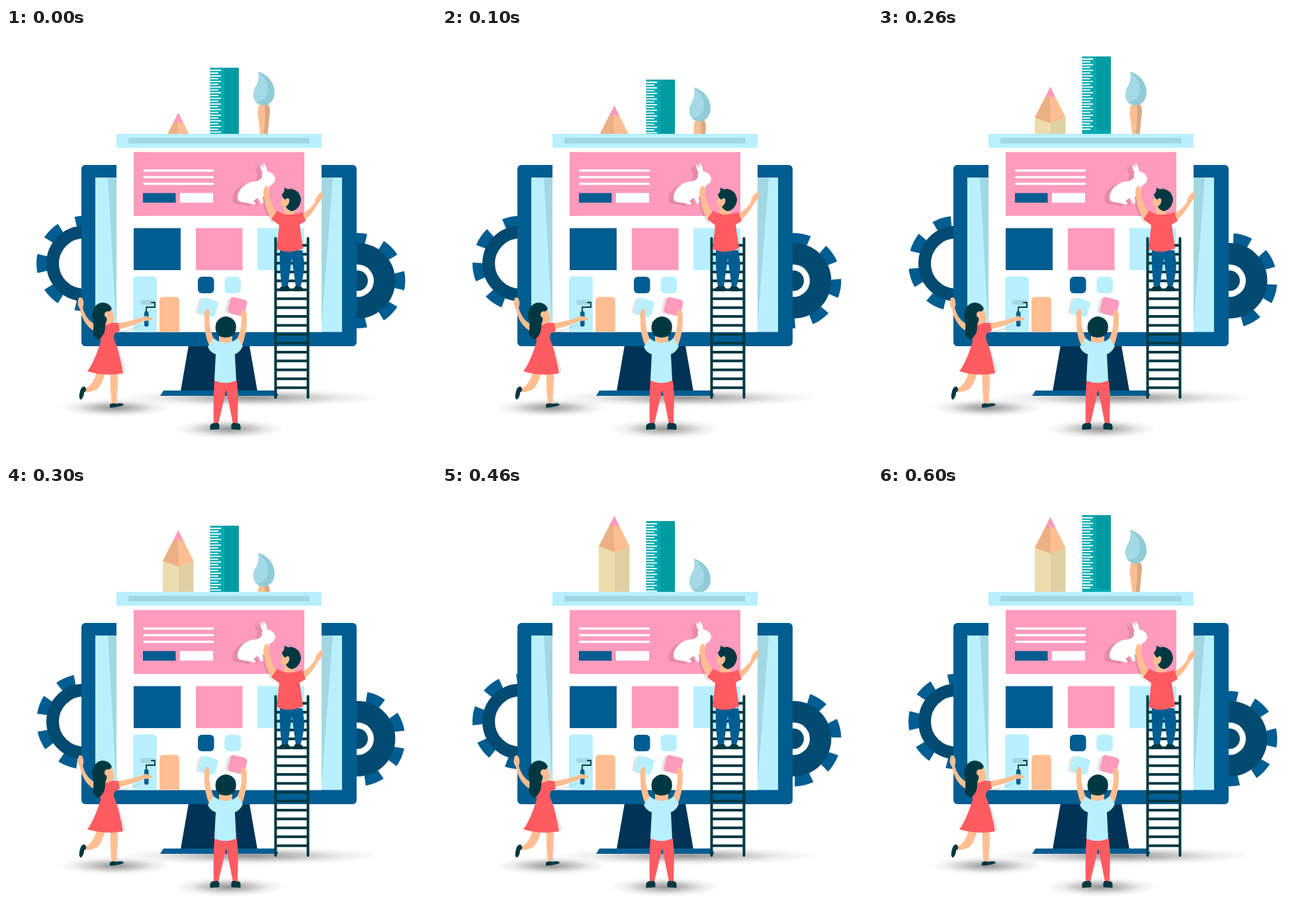
An HTML page that plays this animation: 650x650 px, repeating every 0.7 s.

```html
<!DOCTYPE html>
<html lang="en">
<head>
<meta charset="utf-8">
<title>Building a page</title>
<style>
  html, body { margin: 0; width: 100%; height: 100%; overflow: hidden; background: #fff; }
  svg { display: block; width: 100vw; height: 100vh; }
  .blue { fill: #005d91; } .navy { fill: #034a71; } .ink { fill: #003842; }
  .sky { fill: #b8f0ff; } .mist { fill: #a1d8e4; } .pink { fill: #ff9bbc; }
  .skin { fill: #ffbe91; } .red { fill: #ff5c62; } .white { fill: #fff; }
  .limb { fill: none; stroke: #ffbe91; stroke-linecap: round; stroke-linejoin: round; }
  .cast { fill: #000; opacity: .1; }
  .line { fill: none; stroke: #003842; stroke-linecap: round; }
</style>
</head>
<body>
<svg viewBox="0 0 650 650">
  <defs>
    <radialGradient id="shade">
      <stop offset="0" stop-opacity=".42"/>
      <stop offset=".35" stop-opacity=".25"/>
      <stop offset=".7" stop-opacity=".07"/>
      <stop offset="1" stop-opacity="0"/>
    </radialGradient>
    <clipPath id="above"><path d="M160 0H480V160H160Z"/></clipPath>
    <path id="rabbit" d="M389 204C394 208 394 212 395 217C402 218 407 222 407 229C406 235 401 237 398 239Q398 246 393 251L388 256Q390 261 389 264Q386 267 384 263L381 257Q376 259 374 262L378 265Q375 268 369 265L356 263Q350 262 350 256C351 243 363 233 376 232Q384 231 387 226Q386 221 388 218Q383 212 385 206Q388 209 390 213Q388 208 389 204Z"/>
  </defs>

  <!-- ground shadows -->
  <g fill="url(#shade)">
    <ellipse cx="370" cy="559" rx="200" ry="14"/>
    <ellipse cx="165" cy="574" rx="85" ry="14"/>
    <ellipse cx="337" cy="606" rx="84" ry="15"/>
  </g>

  <!-- gears -->
  <g transform="translate(118 356)">
    <g id="gearL" class="blue"></g>
    <circle r="47.5" fill="none" stroke="#034a71" stroke-width="19"/>
  </g>
  <g transform="translate(531.5 382)">
    <g id="gearR" class="blue"></g>
    <circle r="57" class="navy"/>
    <circle r="24.5" class="white"/>
    <circle r="15.5" class="navy"/>
  </g>

  <!-- monitor -->
  <path d="M276 480H368L380 549H264Z" fill="#003356"/>
  <path d="M238 548H407L412 556H233Z" class="blue"/>
  <rect x="114" y="207" width="416" height="274" rx="6" class="blue"/>
  <path d="M135 226H508V459.500H135Z" class="sky"/>
  <path d="M154 226H167V459ZM477 226H494L477 450Z" class="mist"/>

  <!-- tools -->
  <g clip-path="url(#above)">
    <g id="pencil">
      <path d="M237 45H261V200H237Z" fill="#eddcae"/>
      <path d="M261 45H283.500V200H261Z" fill="#e0d1a4"/>
      <path d="M260.500 0L237 46L261 55Z" fill="#ecb085"/>
      <path d="M260.500 0L283.500 46L261 55Z" class="skin"/>
      <path d="M260.500 0L253 15Q257 18 260.500 13Q264 18 268 15Z" class="pink"/>
    </g>
    <g id="ruler">
      <path d="M308.500 0H352V140H308.500Z" fill="#00aab0"/>
      <path d="M330 0H352V113L330 110Z" fill="#009aa1"/>
      <path id="ticks" stroke="#fff" stroke-width="1.800"/>
    </g>
    <g id="brush">
      <path d="M383 50H397Q400 57 398 68L395 100H385L381 68Q379 57 383 50Z" class="skin"/>
      <path d="M391 50H397Q400 57 398 68L395 100H389Q393 70 391 50Z" fill="#d9a983"/>
      <path d="M381 0C397 4 407 19 406 33C405 46 396 51 389 51C379 51 374 43 374 34C374 23 385 18 381 0Z" fill="#91cbd8"/>
      <path d="M381 0C392 9 397 19 396 30C395 39 389 45 379 46C375 43 374 39 374 34C374 23 385 18 381 0Z" fill="#a2dae5"/>
    </g>
  </g>

  <!-- page -->
  <path d="M167 160H477V459.500H167Z" class="white"/>
  <path d="M167 160H477V181H167Z" class="sky"/>
  <path d="M185 166H458.500V174.500H185Z" class="mist"/>
  <path d="M193 187.500H451V284H193Z" class="pink"/>
  <path d="M209 215.500H312.500M209 225.500H312.500M209 235.500H312.500" stroke="#fff" stroke-width="3.600" stroke-linecap="round"/>
  <path d="M207 249.500H256.500V264H207Z" class="blue"/>
  <path d="M263 249.500H313V264H263Z" class="white"/>
  <use href="#rabbit" x="-8" y="3" class="cast"/>
  <use href="#rabbit" class="white"/>
  <path d="M193 302.500H264V366H193Z" class="blue"/>
  <path d="M287 302.500H357.500V366H287Z" class="pink"/>
  <path d="M380 302.500H451V366H380Z" class="sky"/>
  <path d="M192 459.500V381Q192 375.500 198 375.500H222Q228 375.500 228 381V459.500Z" class="sky"/>
  <path d="M232 459.500V412Q232 406.500 238 406.500H256Q262 406.500 262 412V459.500Z" class="skin"/>
  <rect x="290" y="376" width="24.500" height="25" rx="6" class="blue"/>
  <rect x="330.500" y="376" width="24.500" height="25" rx="6" class="sky"/>
  <g transform="rotate(16 305 422)">
    <rect x="289" y="411" width="25" height="25" rx="5" class="cast"/>
    <rect x="293" y="409.500" width="26" height="25" rx="5" class="sky"/>
  </g>
  <g transform="rotate(14 350 421)">
    <rect x="333" y="410" width="25" height="25" rx="5" class="cast"/>
    <rect x="337" y="408.500" width="26" height="25" rx="5" class="pink"/>
  </g>

  <!-- ladder -->
  <path id="ladder" class="line" stroke-width="4"/>

  <!-- climber -->
  <path d="M387 252Q389 284 404 296L410 286Z" class="cast"/>
  <path d="M414 336H448L451 357Q450 377 445 391H438L432 348L426 391H417Q413 364 414 336Z" class="blue"/>
  <path d="M413 398V394Q416 389 421 391Q427 388 427 391L431 396Q429 398 423 398ZM449 398V394Q446 389 442 391Q437 388 437 391L432 396Q434 398 440 398Z" class="ink"/>
  <path d="M398 246Q396 260 411 282L403 290Q392 276 391 259Q387 247 391 241Q394 236 396 240Z" class="skin"/>
  <path d="M446 282Q461 274 467 263Q467 254 477 248Q481 250 478 258L471 266Q464 281 451 291Z" class="skin"/>
  <path d="M421 266L420 280Q427 288 436 279L434 263Z" class="skin"/>
  <path d="M401 289L410 276Q425 287 448 278L453 292L444 297L449 333Q428 343 409 334L413 298Z" class="red"/>
  <path d="M418 254Q414 263 416 268Q419 273 426 269L434 254Z" class="skin"/>
  <path d="M421 241Q425 245 431 243Q445 246 446 260Q444 274 432 277Q425 275 423 270Q430 265 428 258L423 260Q418 258 417 251Q421 250 421 241Z" class="ink"/>
  <path d="M420 266Q421 258 426 257Q431 260 424 267Z" class="skin"/>

  <!-- painter -->
  <rect x="203" y="411" width="23" height="7.500" rx="3.700" class="mist"/>
  <path d="M220 415H225V422H212V431" class="line" stroke-width="1.800"/>
  <path d="M172 459Q196 452 211 447Q194 455 171 463Z" class="cast"/>
  <path d="M164 477Q175 490 181 520L174 523ZM163 524H171Q169 543 169 566H164Z" class="cast"/>
  <rect x="209" y="428" width="6.500" height="23.500" rx="3" class="blue"/>
  <path d="M138 449Q122 444 116 423Q119 415 115 408Q109 405 109 413Q107 418 112 425Q116 449 136 460Z" class="skin"/>
  <path d="M169 446Q185 444 204 438Q212 433 215 437Q224 437 221 441Q214 443 208 443Q190 451 168 456Z" class="skin"/>
  <path d="M158 520H168Q169 541 166 569H160Q157 544 158 520Z" class="skin"/>
  <path d="M137 520H150Q147 536 138 546Q129 551 119 550L119 545Q132 541 137 520Z" class="skin"/>
  <path d="M157 574V569Q161 566 167 568Q177 566 178 570Q171 573 157 574Z" class="ink"/>
  <path d="M119 542Q124 547 118 551Q118 558 113 562Q109 560 112 549Q114 541 119 542Z" class="ink"/>
  <path d="M148 440H157L156 450L149 453Z" class="skin"/>
  <path d="M146 447Q152 451 159 445L170 446L172 458L165 461Q161 467 165 474Q171 489 177 522Q149 527 123 519Q134 504 143 474Q143 462 133 459L134 448Z" class="red"/>
  <path d="M151 419Q161 421 162 432L164 439Q162 447 155 447Q147 446 147 438Z" class="skin"/>
  <path d="M160 424Q156 415 145 415Q132 417 130 435Q134 447 131 462Q135 470 140 471Q151 464 150 448Q154 440 151 434Q148 430 153 428Q157 430 160 424Z" class="ink"/>
  <path d="M150 437Q147 430 152 429Q156 432 154 438Z" class="skin"/>

  <!-- builder -->
  <path d="M308 482Q299 463 300 440Q298 429 304 424Q309 425 307 436Q307 456 316 474Z" class="skin"/>
  <path d="M356 482Q364 462 364 440Q365 428 359 426Q353 427 356 438Q357 457 347 474Z" class="skin"/>
  <path d="M315 533H349L351 555L350 598H343L333 547L321 598H314Q313 560 315 533Z" class="red"/>
  <path d="M322 463H342V476Q332 481 322 476Z" class="skin"/>
  <path d="M305 482L314 469Q322 476 332 476Q342 476 350 469L358 481Q353 491 346 493L348 533Q332 540 315 533L317 493Q309 491 305 482Z" class="sky"/>
  <path d="M318 445Q324 436 333 436Q343 437 347 446Q350 457 343 465Q332 471 321 465Q314 456 318 445Z" class="ink"/>
  <path d="M309 607V601Q311 597 316 598Q321 596 322 600V606ZM341 606V600Q342 596 347 598Q353 597 354 601V607Z" class="ink" stroke="#003842" stroke-linejoin="round"/>
</svg>
<script>
  const el = id => document.getElementById(id);
  const range = (n, f) => Array.from({ length: n }, (_, i) => f(i)).join('');

  const teeth = range(8, i =>
    `<path transform="rotate(${i * 45})" d="M56 -11L70.500 -14.500A72 72 0 0 1 70.500 14.500L56 11Z"/>`);
  el('gearL').innerHTML = el('gearR').innerHTML = teeth;

  el('ticks').setAttribute('d', range(26, i => `M308.500 ${4 + i * 4.24}H${i % 2 ? 321 : 325}`));
  el('ladder').setAttribute('d', 'M407.500 318V558.500M456.500 318V558.500' +
    range(17, i => `M408 ${328.500 + i * 13.45}H456`));

  // One pose per 100 ms: heights of the tools, turn of the gears in degrees.
  const poses = {
    pencil: [128, 117, 89, 67, 45, 82, 47],
    ruler: [60, 78, 43, 60, 53, 43, 44],
    brush: [66, 90, 66, 101, 110, 80, 66],
    gearL: [0, -10.5, -18, -24, -38, -38, -44],
    gearR: [0, 9.5, 16.5, 23.5, 32, 38, 44]
  };

  function draw(now) {
    const step = Math.floor(now % 700 / 100);
    for (const id in poses) {
      const v = poses[id][step];
      el(id).setAttribute('transform', id.startsWith('gear') ? `rotate(${v})` : `translate(0 ${v})`);
    }
  }
  const start = performance.now();
  function loop() {
    draw(performance.now() - start);
    requestAnimationFrame(loop);
  }
  loop();
</script>
</body>
</html>
```
